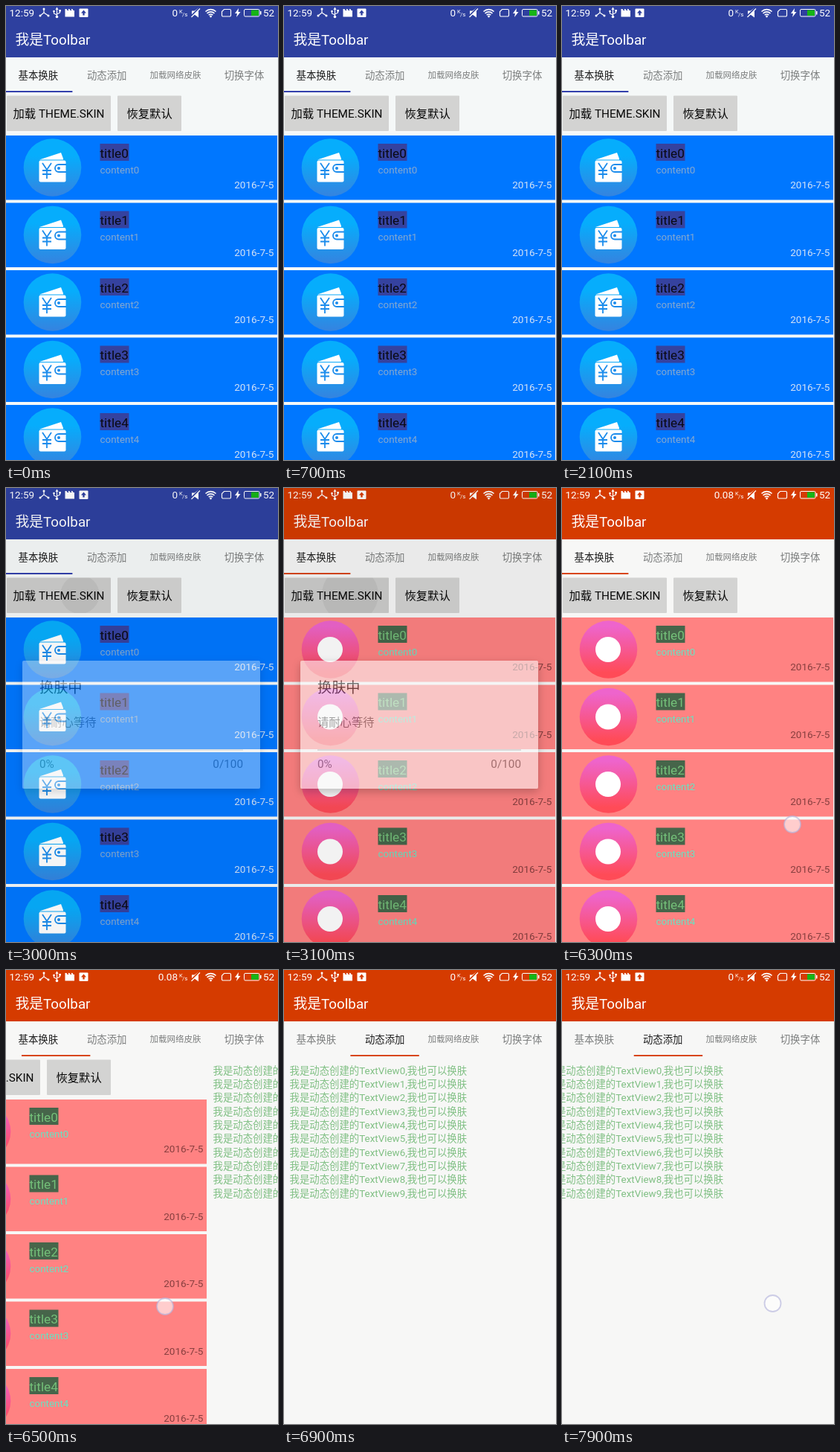
An HTML page that plays this animation: 366x610 px, repeating every 8 s.

```html
<!DOCTYPE html>
<html lang="zh-CN">
<head>
<meta charset="utf-8">
<style>
html, body { margin: 0; width: 100%; height: 100%; overflow: hidden; }
svg {
  display: block; width: 366px; height: 610px;
  font-family: Roboto, "Noto Sans CJK SC", "Noto Sans CJK", sans-serif;
  --bar: #2e409f; --line: #3340ac; --bg: #f5f8f8; --item: #0077ff; --tag: #35429f;
  --title: #0a0a14; --content: #85a8cf; --date: #d3e2f6;
}
svg.red {
  --bar: #d53b00; --line: #d8461a; --bg: #f7f7f6; --item: #ff8282; --tag: #46654a;
  --title: #74c079; --content: #66e3c2; --date: #873f3f;
}
svg.red .wallet, svg:not(.red) .badge { display: none; }
.tab { fill: #7c7e7e; text-anchor: middle; }
.tab.on { fill: #1c1c1c; }
.title { fill: var(--title); font-size: 17.2px; }
.content { fill: var(--content); font-size: 13.4px; }
.date { fill: var(--date); font-size: 13.6px; text-anchor: end; }
.btn { font-size: 15.3px; fill: #080808; }
.added { font-size: 13.4px; fill: #7fbf83; }
.stroke { fill: none; stroke: #fff; }
</style>
</head>
<body>
<svg id="stage" viewBox="0 0 366 610">
  <defs>
    <linearGradient id="sky" x2="0" y2="1">
      <stop offset=".3" stop-color="#06adfc"/><stop offset="1" stop-color="#3583df"/>
    </linearGradient>
    <linearGradient id="rose" x2="0" y2="1">
      <stop offset=".1" stop-color="#ee64cc"/><stop offset=".9" stop-color="#ff4b57"/>
    </linearGradient>
    <clipPath id="btnClip"><rect x="1" y="120.500" width="140" height="47.500"/></clipPath>
    <filter id="shadow" x="-10%" y="-10%" width="120%" height="125%">
      <feDropShadow dx="0" dy="4" stdDeviation="6" flood-opacity=".4"/>
    </filter>
  </defs>
  <rect width="366" height="610" fill="var(--bg)"/>

  <g id="pages">
    <g fill="#d3d3d2">
      <rect x="1" y="120.500" width="140" height="47.500" rx="1"/>
      <rect x="150" y="120.500" width="86" height="47.500" rx="1"/>
    </g>
    <g id="ripple" clip-path="url(#btnClip)">
      <rect x="1" y="120" width="140" height="48" fill-opacity=".03"/>
      <circle id="wave" cy="143" fill-opacity=".05"/>
    </g>
    <text class="btn" x="9.500" y="149.500">加载 THEME.SKIN</text>
    <text class="btn" x="162.500" y="149.500">恢复默认</text>
    <g id="list"></g>
    <g id="added"></g>
  </g>

  <rect width="366" height="69" fill="var(--bar)"/>
  <text x="12.500" y="52" font-size="18.800" fill="#fff">我是Toolbar</text>

  <g id="status" fill="#fff" font-size="13.500">
    <text x="4.500" y="14">12:59</text>
    <path class="stroke" d="M51 4V9L46 13M51 9L57 13" stroke-width="1.200"/>
    <circle cx="51" cy="4" r="1.500"/><circle cx="46" cy="13" r="1.500"/><circle cx="57" cy="13" r="1.500"/>
    <path class="stroke" d="M68.500 4V14M64.500 7V10L68.500 12M72.500 6V9L68.500 11" stroke-width="1.200"/>
    <path d="M66.500 5L68.500 1.500L70.500 5Z"/>
    <circle cx="68.500" cy="14.500" r="1.800"/><circle cx="64.500" cy="7" r="1.300"/>
    <path d="M71.300 5h2.600v2.600h-2.600zM79.500 4h2l1 2h2l-1-2h2l1 2h2l-1-2h2l1 2h1.500V14.500h-12.500z"/>
    <rect x="98.500" y="3.500" width="12" height="11.500" rx="1"/>
    <path d="M104.500 5.500l3.500 4h-2.300v3h-2.400v-3h-2.300z" fill="var(--bar)"/>
    <text id="speed" x="231" y="14" text-anchor="end"></text>
    <text x="233" y="10" font-size="7.500">K</text>
    <text x="237" y="13.500" font-size="8">/s</text>
    <path d="M250 6.500h3.500l5.500-4v13l-5.500-4h-3.500z"/>
    <path d="M249 14L260 3" stroke="var(--bar)" stroke-width="2.600"/>
    <path class="stroke" d="M249.500 15L261 3.500" stroke-width="1.300"/>
    <path class="stroke" d="M268.500 7.500a10 10 0 0 1 14 0M270.500 10a7 7 0 0 1 10 0M272.700 12.200a4 4 0 0 1 5.600 0" stroke-width="1.600"/>
    <circle cx="275.500" cy="14" r="1.400"/>
    <path class="stroke" d="M293.500 4.500H301a1.500 1.500 0 0 1 1.500 1.500V12.500a1.500 1.500 0 0 1-1.500 1.500H292a1.500 1.500 0 0 1-1.500-1.500V7.500z" stroke-width="1.200"/>
    <path d="M313 3l-5 7h3l-1 5l5.500-7h-3z"/>
    <rect class="stroke" x="320.500" y="4.500" width="20.500" height="9.500" rx="1.500"/>
    <path d="M342 7h1.500v4.500h-1.500z"/>
    <rect x="330" y="5.500" width="10" height="7.500" fill="#16b416"/>
    <text x="346" y="14">52</text>
  </g>

  <g id="tabs"></g>
  <rect id="mark" y="114" width="92.400" height="2" fill="var(--line)"/>

  <rect id="dim" width="366" height="610"/>
  <g id="dialog">
    <rect x="22" y="232" width="320" height="172" rx="2" fill="#fff" filter="url(#shadow)"/>
    <g font-size="15.300" fill="#666">
      <text x="45" y="275" font-size="19.200" fill="#111">换肤中</text>
      <text x="45" y="320">请耐心等待</text>
      <rect x="45" y="351" width="274" height="2" fill="#ccc"/>
      <text x="45" y="376">0%</text>
      <text x="319" y="376" text-anchor="end">0/100</text>
    </g>
  </g>
  <circle id="touch" r="11" fill="#fff" fill-opacity=".6" stroke="#b4b4dc" stroke-opacity=".65" stroke-width="1.800"/>
</svg>
<script>
const $ = id => document.getElementById(id);
const repeat = (n, make) => Array.from({ length: n }, (_, i) => make(i)).join('');
const PAGE = 366, TAB = 92.4, LOOP = 8000;

$('list').innerHTML = repeat(5, i => `
  <g transform="translate(0 ${174 + i * 90.5})">
    <rect width="365" height="86.500" fill="var(--item)"/>
    <g class="wallet">
      <circle cx="62.500" cy="43" r="38.800" fill="url(#sky)"/>
      <path d="M45 32.500L74 23L77 31V32.500Z" fill="#fff"/>
      <rect x="44.500" y="33.500" width="36" height="29" rx="2" fill="#fff"/>
      <g fill="none" stroke="#1b8cec" stroke-width="1.800">
        <path d="M49 37L55 46L61 37M55 46V58M49 47H61M49 52H61"/>
        <path d="M81 39H71a5 5 0 0 0 0 10H81"/>
      </g>
      <circle cx="71" cy="44" r="2" fill="#1b8cec"/>
    </g>
    <g class="badge">
      <circle cx="62.500" cy="43" r="38.800" fill="url(#rose)"/>
      <circle cx="62" cy="43" r="17" fill="#fff"/>
    </g>
    <rect x="126.500" y="11" width="39" height="23" fill="var(--tag)"/>
    <text class="title" x="126.500" y="29.500">title${i}</text>
    <text class="content" x="126.500" y="50.500">content${i}</text>
    <text class="date" x="360.500" y="71">2016-7-5</text>
  </g>`);

$('added').innerHTML = repeat(10, i =>
  `<text class="added" x="${PAGE + 7.5}" y="${139.8 + i * 18.33}">我是动态创建的TextView${i},我也可以换肤</text>`);

const tabNames = ['基本换肤', '动态添加', '加载网络皮肤', '切换字体'];
$('tabs').innerHTML = tabNames.map((name, i) =>
  `<text class="tab" x="${43.3 + i * TAB}" y="${i === 2 ? 97 : 97.7}" font-size="${i === 2 ? 11.5 : 13.4}">${name}</text>`).join('');

// Linear interpolation through [time, value] points
function track(points, t) {
  const k = points.findIndex(p => p[0] > t);
  if (k === 0) return points[0][1];
  if (k < 0) return points[points.length - 1][1];
  const [t0, a] = points[k - 1], [t1, b] = points[k];
  return a + (b - a) * (t - t0) / (t1 - t0);
}

const scroll = [[6300, 0], [6400, 24], [6500, 95], [6600, 215], [6700, 310], [6800, 355],
  [6900, 366], [7800, 366], [7900, 395]];
const touchX = [[3000, 110], [3800, 318.5], [6200, 318.5], [6300, 310], [6400, 285], [6500, 214],
  [7700, 318], [7800, 305], [7900, 283.5]];
const touchY = [[3000, 139], [3800, 452], [6500, 452], [7700, 450], [7900, 448]];
const dialogAlpha = [[2900, 0], [3000, .35], [3100, .56], [3200, .15], [3300, 0]];
const dimAlpha = [[2900, 0], [3000, .04], [3100, .05], [3200, .02], [3300, 0]];
const rippleAlpha = [[2400, 0], [2500, .6], [2900, .6], [3000, 1], [3100, 1], [3500, 0]];
const waveSize = [[2900, 18], [3000, 26], [3100, 38], [3300, 70]];
const waveX = [[2900, 110], [3100, 89], [3300, 71]];

const within = (t, a, b) => t >= a && t < b;

function draw(now) {
  const t = Math.floor(now % LOOP / 100) * 100;
  const x = track(scroll, t);
  $('stage').classList.toggle('red', t >= 3100);
  $('pages').setAttribute('transform', `translate(${-x} 0)`);
  $('mark').setAttribute('x', -3 + x / PAGE * TAB);
  const selected = t >= 6600 ? 1 : 0;
  [...$('tabs').children].forEach((tab, i) => tab.classList.toggle('on', i === selected));
  $('speed').textContent = within(t, 3500, 6700) ? '0.08' : '0';

  $('dialog').style.opacity = track(dialogAlpha, t);
  $('dim').style.opacity = track(dimAlpha, t);
  $('ripple').style.opacity = track(rippleAlpha, t);
  $('wave').setAttribute('r', track(waveSize, t));
  $('wave').setAttribute('cx', track(waveX, t));

  const touching = within(t, 2500, 3000) || within(t, 3800, 6600) || t >= 7700;
  $('touch').style.display = touching ? '' : 'none';
  $('touch').setAttribute('cx', track(touchX, t));
  $('touch').setAttribute('cy', track(touchY, t));
}

const start = performance.now();
(function loop() {
  draw(performance.now() - start);
  requestAnimationFrame(loop);
})();
</script>
</body>
</html>
```
